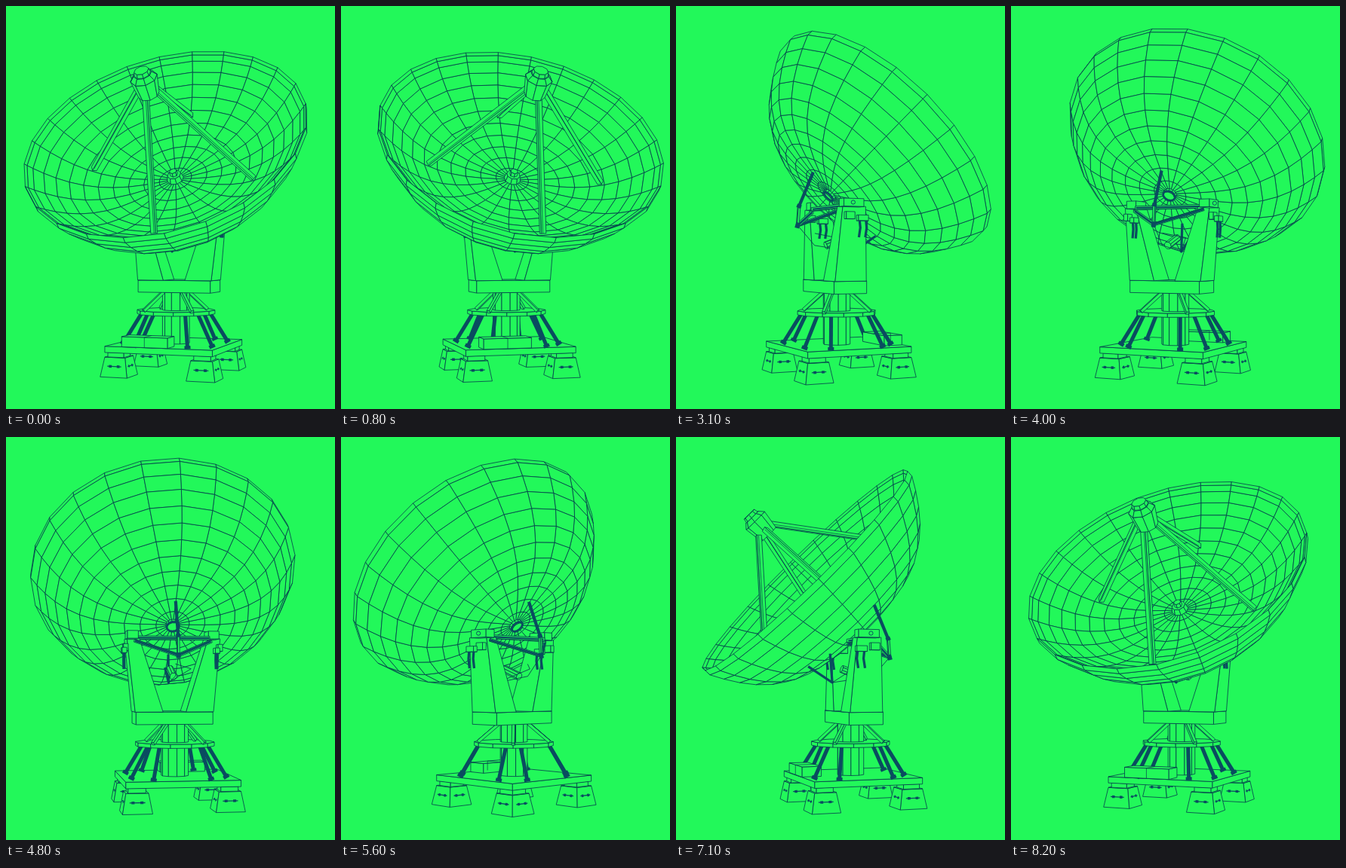
An HTML page with a canvas for the animation above (8.3 s loop, 436 by 535 pixels).

```html
<!DOCTYPE html>
<html lang="en">
<head>
<meta charset="utf-8">
<title>Rotating dish antenna</title>
<style>
  html, body { margin: 0; width: 100%; height: 100%; overflow: hidden; background: #22f85a; }
  canvas { display: block; width: 436px; height: 535px; }
</style>
</head>
<body>
<canvas id="stage" width="436" height="535"></canvas>
<script>
const ctx = document.getElementById('stage').getContext('2d');
const GREEN = '#22f85a', LINE = 'rgba(6,62,78,0.85)', DARK = '#0a4c60';
const LOOP = 8300, STEP = 100, FACING = 440;
const AXIS_X = 222, HORIZON = 330, CAMERA = 1150;
const TAU = Math.PI * 2;

// Model points are [forward, sideways, up] around the turning axis.
let sinT = 0, cosT = 1, sideShift = 0;

const depthOf = ([r, q]) => r * cosT - (q + sideShift) * sinT;
function project(p) {
  const s = CAMERA / (CAMERA - depthOf(p));
  return [AXIS_X + (p[0] * sinT + (p[1] + sideShift) * cosT) * s, HORIZON - p[2] * s];
}

const mix = (a, b, k) => a.map((v, i) => v + (b[i] - v) * k);
const cross = (a, b) => [a[1] * b[2] - a[2] * b[1], a[2] * b[0] - a[0] * b[2], a[0] * b[1] - a[1] * b[0]];
const unit = a => { const l = Math.hypot(...a); return a.map(v => v / l); };

function path(points) {
  ctx.beginPath();
  points.forEach(([x, y], i) => i ? ctx.lineTo(x, y) : ctx.moveTo(x, y));
}

// Draws a face if it turns towards the camera.
function face(points) {
  const p = points.map(project);
  let area = 0;
  p.forEach(([x, y], i) => {
    const [u, v] = p[(i + 1) % p.length];
    area += x * v - u * y;
  });
  if (area >= 0) return false;
  path(p);
  ctx.closePath();
  ctx.fillStyle = GREEN;
  ctx.fill();
  ctx.strokeStyle = LINE;
  ctx.lineWidth = 0.95;
  ctx.stroke();
  return true;
}

function prism(bottom, top, onSide) {
  const n = bottom.length;
  face([...bottom].reverse());
  for (let i = 0; i < n; i++) {
    const j = (i + 1) % n, side = [bottom[i], bottom[j], top[j], top[i]];
    if (face(side) && onSide) onSide(side);
  }
  face(top);
}

function tube(a, b, ra, rb = ra, n = 4) {
  const d = unit(b.map((v, i) => v - a[i]));
  const u = unit(cross(d, Math.abs(d[2]) > 0.95 ? [1, 0, 0] : [0, 0, 1]));
  const v = cross(d, u);
  const ring = (c, rad) => Array.from({ length: n }, (_, i) => {
    const t = (i + 0.5) / n * TAU;
    return c.map((k, m) => k + rad * (Math.cos(t) * u[m] + Math.sin(t) * v[m]));
  });
  prism(ring(a, ra), ring(b, rb));
}

const rect = (r, q, hr, hq, h) =>
  [[r + hr, q + hq, h], [r - hr, q + hq, h], [r - hr, q - hq, h], [r + hr, q - hq, h]];

function stroke(points, width, color = DARK) {
  path(points.map(project));
  ctx.strokeStyle = color;
  ctx.lineWidth = width;
  ctx.stroke();
}

const byDepth = list => list.sort((a, b) => depthOf(a.at) - depthOf(b.at));
const drawSorted = parts => byDepth(parts).forEach(p => p.draw());

// ---- base ----
const CENTER = -10, DECK = -118;
const polar = (rad, t, h) => [CENTER + rad * Math.cos(t), rad * Math.sin(t), h];

function drawFoot([r, q]) {
  prism(rect(r, q, 18.5, 18.5, -157), rect(r, q, 14, 14, -132), ([a, b, c, d]) => {
    const left = mix(a, d, 0.55), right = mix(b, c, 0.55);
    const mark = (from, to, width) => stroke([mix(left, right, from), mix(left, right, to)], width);
    mark(0.2, 0.8, 1.3);
    for (const k of [0.33, 0.67]) mark(k - 0.06, k + 0.06, 3.4);
  });
  prism(rect(r, q, 11, 11, -132), rect(r, q, 11, 11, -126));
}

function drawBase() {
  const feet = [];
  for (const a of [-58, 58]) for (const b of [-58, 58]) {
    const at = [CENTER + a, b, -140];
    feet.push({ at, draw: () => drawFoot(at) });
  }
  drawSorted(feet);
  prism(rect(CENTER, 0, 72, 72, DECK - 8), rect(CENTER, 0, 72, 72, DECK));

  const parts = [
    { at: [CENTER, 0, -100], draw: () => tube([CENTER, 0, DECK], [CENTER, 0, -78], 18, 18, 10) },
    { at: [48, -18, -115], draw: () => {
      prism(rect(48, -18, 13, 31, DECK), rect(48, -18, 13, 31, DECK + 13));
      stroke([[61, -18, DECK], [61, -18, DECK + 13], [35, -18, DECK + 13]], 0.8, LINE);
    } }
  ];
  const corners = [0, 1, 2, 3].map(i => TAU * (i + 0.5) / 4);
  for (const t of corners) for (const k of [-1, 1]) {
    const top = polar(47, t + k * 0.2, -78), foot = polar(71, t + k * 0.25, DECK + 1);
    parts.push({ at: mix(top, foot, 0.5), draw: () => {
      stroke([top, foot], 5);
      stroke([mix(foot, top, 0.05), mix(foot, top, -0.05)], 8);
    } });
  }
  drawSorted(parts);

  tube([CENTER, 0, -79], [CENTER, 0, -74], 52, 52, 12);
  const upper = [{ at: [CENTER, 0, 0], draw: () => tube([CENTER, 0, -74], [CENTER, 0, -50], 18, 18, 10) }];
  for (const t of corners) {
    const a = polar(47, t, -74), b = polar(19, t, -50);
    upper.push({ at: a, draw: () => tube(a, b, 2.8) });
  }
  drawSorted(upper);
}

// ---- yoke and drive rods ----
function drawArm(side) {
  const q = side * 53, out = side * 62;
  prism(rect(-12, side * 33, 22, 18, -34), rect(-12, q, 16, 8, 61));
  prism(rect(-12, q, 14, 7, 61), rect(-12, q, 14, 7, 71));
  if (-side * sinT > 0.2) {
    const [x, y] = project([-14, out, 66]);
    ctx.beginPath();
    ctx.arc(x, y, 2.6, 0, TAU);
    ctx.strokeStyle = DARK;
    ctx.lineWidth = 1;
    ctx.stroke();
  }
  prism(rect(-19, out, 6, 3, 45), rect(-19, out, 6, 3, 54));
  prism(rect(-1, out, 7, 3, 43), rect(-1, out, 7, 3, 50));
  for (const r of [-5, 4]) stroke([[r, out, 43], [r + 1, out, 34], [r - 1, out, 22]], 3.2);
}

function yokeParts() {
  const pivot = [-64, 0, 38], elbow = [-62, 0, 63], push = [-42, 0, 108], low = [17, 0, 4];
  return [
    ...[-1, 1].map(side => ({ at: [-12, side * 50, 0], draw: () => drawArm(side) })),
    { at: [-20, 0, 0], draw: () => {
      tube([-22, -48, 62], [-22, 48, 62], 3.2);
      stroke([[-22, -48, 62], [-22, 48, 62]], 2.2);
    } },
    { at: [12, 0, 0], draw: () => {
      stroke([[20, 0, 42], low, [50, 0, 25]], 3.2);
      tube([-24, 0, 12], [4, 0, 22], 5, 5, 8);
      stroke([pivot, [-40, 0, 12], low], 1, LINE);
      stroke([mix(pivot, low, 0.3), [-20, -24, 22], low], 1, LINE);
    } },
    { at: [-60, 0, 0], draw: () => {
      for (const side of [-1, 1]) {
        tube([-22, side * 50, 58], pivot, 2.4);
        stroke([[-22, side * 50, 58], pivot], 2.6);
      }
      tube(elbow, pivot, 2);
      stroke([push, elbow], 4.2);
      for (const p of [pivot, elbow]) stroke([mix(p, push, -0.05), mix(p, push, 0.05)], 6);
    } }
  ];
}

// ---- dish ----
const R = 183, SPOKES = 24, NR = 0.724, NH = 0.69, BOWL = 75;
const RINGS = [0.04, ...Array.from({ length: 11 }, (_, i) =>
  0.12 + 0.88 * Math.sin(i * 0.122) / Math.sin(1.22))];

function dishPoint(rho, psi, depth) {
  const up = R * rho * Math.cos(psi);
  return [58 - up * NH - depth * NR, R * rho * Math.sin(psi), 151.5 + up * NR - depth * NH];
}
const innerDepth = rho => BOWL * (1 - rho ** 3);
const outerDepth = rho => 8 + 96 * (1 - rho ** 4);

function surface(profile, inner) {
  const quads = [];
  for (let k = 1; k < profile.length; k++) for (let j = 0; j < SPOKES; j++) {
    const a = TAU * j / SPOKES, b = TAU * (j + 1) / SPOKES;
    const [p, dp] = profile[k - 1], [s, ds] = profile[k];
    const quad = [dishPoint(p, a, dp), dishPoint(s, a, ds), dishPoint(s, b, ds), dishPoint(p, b, dp)];
    quads.push({ at: mix(quad[0], quad[2], 0.5), quad: inner ? quad.reverse() : quad });
  }
  byDepth(quads).forEach(f => face(f.quad));
}

function drawInside() {
  const rings = [...RINGS.slice(0, -1), 0.985, 1];
  surface(rings.map(rho => [rho, innerDepth(rho)]), true);
  if (cosT > 0.14) {
    tube(dishPoint(0, 0, BOWL), dishPoint(0, 0, BOWL - 8), 11, 9, 8);
    tube(dishPoint(0, 0, BOWL - 8), dishPoint(0, 0, BOWL - 14), 5, 5, 6);
  }
}

function drawFeed() {
  const legs = [[0, 0.62], [102, 0.63], [176, 0.69], [273, 0.62]].map(([angle, rho]) => {
    const psi = angle / 360 * TAU, end = dishPoint(rho, psi, innerDepth(rho));
    const start = dishPoint(11 / R, psi, -70);
    return { at: mix(start, end, 0.5), draw: () => {
      tube(start, end, 4.4);
      stroke([start, end], 0.8, LINE);
    } };
  });
  const head = { at: dishPoint(0, 0, -82), draw: () => {
    tube(dishPoint(0, 0, -62), dishPoint(0, 0, -86), 13, 16.5, 8);
    tube(dishPoint(0, 0, -86), dishPoint(0, 0, -92), 16.5, 11, 8);
    tube(dishPoint(0, 0, -92), dishPoint(0, 0, -97), 10, 9, 8);
  } };
  drawSorted([...legs, head]);
}

function drawShell() {
  surface([...RINGS.map(rho => [rho, outerDepth(rho)]), [1, 0]], false);
  if (cosT < -0.3) {
    tube(dishPoint(0, 0, 104), dishPoint(0, 0, 110), 9, 8, 12);
    const ring = Array.from({ length: 13 }, (_, i) => dishPoint(0.045, TAU * i / 12, 108));
    stroke(ring, 2.6);
  }
}

function drawDish() {
  const [r, , h] = dishPoint(0, 0, 0);
  const ahead = NR * (CAMERA * cosT - r) - NH * h > 0;
  if (ahead) { drawInside(); drawFeed(); }
  else { drawFeed(); drawInside(); }
  drawShell();
}

function render(time) {
  const t = Math.floor(time % LOOP / STEP) * STEP;
  const turn = (t - FACING) / LOOP * TAU;
  sinT = Math.sin(turn);
  cosT = Math.cos(turn);
  ctx.fillStyle = GREEN;
  ctx.fillRect(0, 0, 436, 535);
  ctx.lineJoin = 'round';
  sideShift = 0;
  drawBase();
  sideShift = 4;
  prism(rect(-12, 0, 23, 50, -50), rect(-12, 0, 23, 50, -34));
  const parts = yokeParts();
  const behind = p => cosT > 0.35 || depthOf(p.at) < -32;
  drawSorted(parts.filter(behind));
  drawDish();
  drawSorted(parts.filter(p => !behind(p)));
}

const begin = performance.now();
function tick() {
  render(performance.now() - begin);
  requestAnimationFrame(tick);
}
tick();
</script>
</body>
</html>
```
